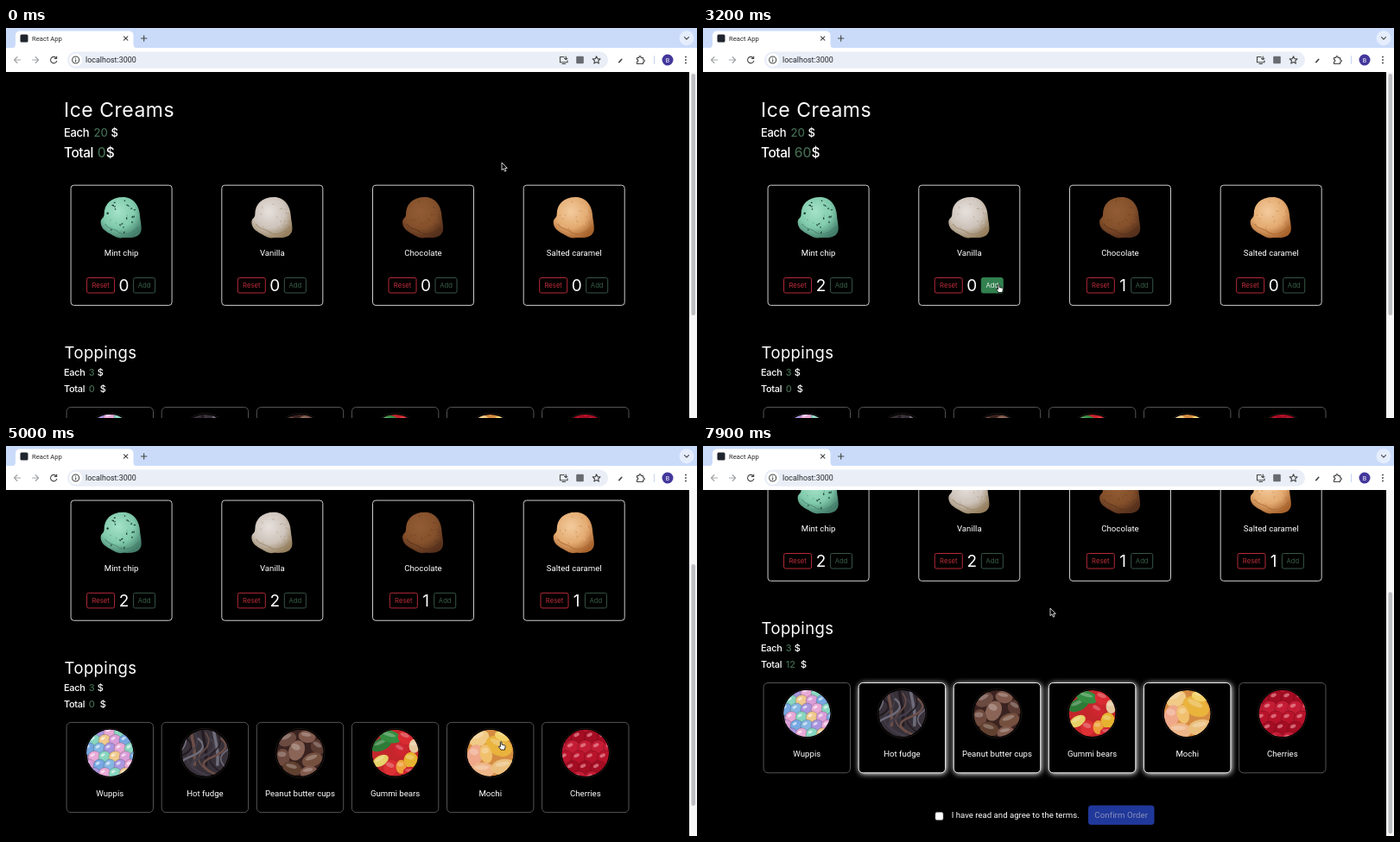
These frames come from a looping animation (800 by 452 pixels, 8 s). An HTML page:

```html
<!DOCTYPE html>
<html lang="en">
<head>
<meta charset="utf-8">
<title>Ice cream order</title>
<style>
  html, body { margin: 0; width: 100%; height: 100%; overflow: hidden; background: #000; }
  svg { display: block; width: 800px; height: 452px; }
  text { font: 9.65px Roboto, sans-serif; fill: #fff; }
  .mid { text-anchor: middle; }
  .h1 { font: 23px Inter, sans-serif; letter-spacing: .5px; }
  .h2 { font: 18.5px Inter, sans-serif; letter-spacing: .4px; }
  .l { font: 500 15.5px Inter, sans-serif; }
  .m { font: 500 13.1px Inter, sans-serif; }
  .s { font: 500 11px Inter, sans-serif; }
  .word { letter-spacing: -.03em; }
  .count { font: 19px Inter, sans-serif; }
  .btn text { font: 7.7px Inter, sans-serif; }
  .green { fill: #41684f; }
  .btn rect { fill: #000; stroke: var(--line); }
  .btn text { fill: var(--ink); }
  .btn.hover rect { fill: var(--on); stroke: var(--on); }
  .btn.hover text { fill: #e8eee9; }
  .reset { --line: #b52a38; --ink: #c22e3c; --on: #c93443; }
  .add { --line: #365646; --ink: #386049; --on: #32804f; }
  .topping > .glow { visibility: hidden; }
  .topping > .card { fill: #000; stroke: #555; }
  .topping.on > .glow { visibility: visible; }
  .topping.on > .card { stroke: #eee; }
  .icon { fill: none; stroke: #454746; stroke-width: 1.1; stroke-linecap: round; stroke-linejoin: round; }
</style>
</head>
<body>
<svg id="stage" viewBox="0 0 800 452"></svg>
<script>
const LOOP = 8000;
const byId = id => document.getElementById(id);
const text = (x, y, str, cls = '', extra = '') =>
  `<text x="${x}" y="${y}" class="${cls}" ${extra}>${str}</text>`;
const rect = (x, y, w, h, r, extra = '') =>
  `<rect x="${x}" y="${y}" width="${w}" height="${h}" rx="${r}" ${extra}/>`;
const circle = (x, y, r, fill, extra = '') =>
  `<circle cx="${x}" cy="${y}" r="${r}" fill="${fill}" ${extra}/>`;
const ellipse = (x, y, rx, ry, turn, fill) =>
  `<ellipse rx="${rx}" ry="${ry}" fill="${fill}" transform="translate(${x} ${y}) rotate(${turn})"/>`;
const icon = (d, extra = '') => `<path class="icon" d="${d}" ${extra}/>`;
const range = n => [...Array(n).keys()];
function seeded(seed) {
  return () => (seed = (seed * 16807) % 2147483647) / 2147483647;
}

// Ice creams: name, light, middle and dark tone
const creams = [
  ['Mint chip', '#a5e3c9', '#7fc9aa', '#447e6b'],
  ['Vanilla', '#e6e0dc', '#cdc3ba', '#96805f'],
  ['Chocolate', '#925d35', '#84502b', '#56301c'],
  ['Salted caramel', '#f3cb9d', '#e3aa70', '#a9642e']
];
const creamX = i => 133.6 + 174.7 * i;
const SCOOP = 'M2-24C14-24 21-14 21.500-2C22 5 25 14 21.500 18C18 24 8 23 2 23C-4 25-10 20-14 18' +
  'C-18 16-24 12-24 5C-24 0-20 1-20-4C-20-16-12-24 2-24Z';

function scoop(i) {
  const rnd = seeded(71 + i * 13), [, light, , dark] = creams[i];
  const specks = range(i ? 26 : 34).map(k => {
    const a = rnd() * 6.28, r = Math.sqrt(rnd()) * 20;
    const x = 1 + r * Math.cos(a), y = r * Math.sin(a) - 1;
    if (!i && k < 22) return ellipse(x, y, .8 + rnd() * .7, .7, rnd() * 180, '#1f3f38');
    return `<g opacity=".4">${ellipse(x, y, 1 + rnd(), .5, rnd() * 90, k % 2 ? light : dark)}</g>`;
  }).join('');
  return `<path d="${SCOOP}" fill="url(#scoop${i})"/>${specks}
    <path d="M-19 7C-14 15-7 12-3 17C4 21 14 18 20 10" fill="none" stroke="${dark}" stroke-width="1.3" opacity=".6"/>`;
}

const button = (kind, label, i, x, w) => `<g class="btn ${kind}" id="${kind}${i}">
  ${rect(x, 289.5, w, 17.5, 2)}${text(x + w / 2, 301.2, label, 'mid')}</g>`;

const creamCard = ([name], i) => `<g transform="translate(${creamX(i)})">
  ${rect(-58.5, 182.2, 117, 139.2, 3.5, 'fill="#000" stroke="#ccc"')}
  <g transform="translate(0 220)">${scoop(i)}</g>
  ${text(0, 263.7, name, 'mid')}
  ${button('reset', 'Reset', i, -40, 32)}
  ${text(3, 305, '0', 'count mid', `id="count${i}"`)}
  ${button('add', 'Add', i, 14, 25)}</g>`;

// Toppings
const balls = (r, step, colors, shine) => range(30).map(k => {
  const row = Math.floor(k / 5), col = k % 5;
  const x = (col - 2 + row % 2 / 2) * step, y = (row - 2.5) * step * .8;
  return circle(x, y, r, colors[(k * 3 + row) % colors.length], 'stroke="#0003"') +
    ellipse(x - r * .3, y - r * .35, r * .38, r * .22, -25, shine);
}).join('');
const blobs = list => list.map(([color, x, y, rx, ry, turn]) =>
  ellipse(x, y, rx, ry, turn, color) +
  `<g opacity=".25">${ellipse(x - 1, y - ry * .35, rx * .6, ry * .3, turn, '#fff')}</g>`).join('');
const swirls = () => range(13).map(k => {
  const x = -26 + k * 4.4, bend = 8 * Math.sin(k * 2.1);
  return `<path d="M${x} ${-24 + bend}q${9 + bend} 12 ${-3 - bend} 22t${8 + bend} 24" fill="none"
    stroke="${['#6e6c7b', '#241c22', '#6b4e48', '#433d49'][k % 4]}" stroke-width="${1.5 + k % 3}"/>`;
}).join('');

const toppings = [
  ['Wuppis', '#8b83b5', balls(7.2, 12,
    ['#86b7e4', '#d99dd8', '#87d6c0', '#a996df', '#77a8e2', '#f0c98d', '#e9a9d6'], '#fff9')],
  ['Hot fudge', '#383139', swirls()],
  ['Peanut butter cups', '#3a2320', blobs([
    ['#6b4a40', -15, -16, 11, 8, -25], ['#80594c', 8, -19, 10, 7, 10], ['#5c3b32', 21, -7, 9, 8, 30],
    ['#8a6557', -4, -3, 9, 12, 25], ['#6e493d', -20, 5, 8, 10, 0], ['#75503f', 14, 8, 12, 8, -20],
    ['#60402f', -9, 18, 11, 8, 15], ['#805a4d', 10, 22, 10, 7, -10]])],
  ['Gummi bears', '#c4262b', blobs([
    ['#2d7b37', -16, -10, 13, 7, -25], ['#348d41', -6, -19, 13, 7, 15], ['#d82b32', 12, -18, 9, 8, 20],
    ['#e6c79c', 22, -8, 6, 8, 0], ['#cf2530', 6, -4, 8, 7, 30], ['#e5b32f', 18, 8, 8, 9, 10],
    ['#e7d168', -17, 9, 10, 6, -30], ['#dc3034', -5, 17, 8, 9, 20], ['#eda03a', 7, 16, 6, 8, 0],
    ['#d32631', 18, 22, 9, 6, 0]])],
  ['Mochi', '#d58c42', blobs([
    ['#f0ca86', -13, -17, 12, 9, -25], ['#e9b33c', 10, -8, 16, 11, 25], ['#f2d169', 15, -20, 10, 6, 10],
    ['#efa88a', -18, 3, 9, 13, 15], ['#f1c06d', -5, 1, 7, 11, -15], ['#efb68a', -9, 20, 14, 9, 0],
    ['#eabf7d', 15, 16, 14, 9, -10]])],
  ['Cherries', '#5e0713', balls(9, 15, ['#b9132b', '#a50d23', '#c51c35'], '#f0a0a999')]
];
const topX = i => 120.3 + 110.1 * i;
const toppingCard = ([name, base, art], i) => `<g class="topping" id="topping${i}" transform="translate(${topX(i)})">
  ${rect(-50, 440, 101.5, 105, 6, 'class="glow" fill="#fff" filter="url(#blur)"')}
  ${rect(-50.2, 439.5, 100.4, 104.3, 5, 'class="card"')}
  <g transform="translate(0 475)">
    ${circle(0, 0, 28.5, 'none', 'stroke="#1b1715"')}
    <g clip-path="url(#round)">${circle(0, 0, 27, base)}${art}</g>
  </g>
  ${text(0, 524.8, name, 'mid')}</g>`;

const page = `<g id="page">
  ${text(67, 102.7, 'Ice Creams', 'h1')}
  ${text(67, 125.8, 'Each', 'm word')}${text(101.5, 125.8, '<tspan class="green">20</tspan> $', 'm')}
  ${text(67, 150.2, 'Total', 'l word')}${text(105.7, 150.2, '', 'l', 'id="creamTotal"')}
  ${creams.map(creamCard).join('')}
  ${text(67.5, 382.7, 'Toppings', 'h2')}
  ${text(67, 402.8, 'Each', 's word')}${text(95.8, 402.8, '<tspan class="green">3</tspan> $', 's')}
  ${text(67, 421.8, 'Total', 's word')}${text(95.8, 421.8, '', 's', 'id="topTotal"')}
  ${toppings.map(toppingCard).join('')}
  ${rect(269, 589.5, 9, 9, 1.8, 'fill="#fff" stroke="#888" stroke-width=".6"')}
  ${text(287.7, 596.3, 'I have read and agree to the terms.')}
  ${rect(446, 581.5, 76.5, 22.5, 3.500, 'fill="#20389a"')}
  ${text(484.2, 596.3, 'Confirm Order', 'mid', 'style="fill:#8790b8;letter-spacing:.1px"')}
</g>`;

const browser = `
  ${rect(791, 51, 9, 401, 0, 'fill="#f7f7f8"')}
  ${rect(793.5, 53, 4.6, 280, 2.3, 'id="thumb" fill="#bdbec1"')}
  ${rect(0, 0, 800, 24, 0, 'fill="#cadbfa"')}
  ${rect(0, 23, 800, 28, 0, 'fill="#fff"')}
  <path d="M6 23.500q5 0 5-5V9q0-5.500 5.500-5.500H142q5.500 0 5.500 5.500v9.500q0 5 5 5Z" fill="#fff"/>
  ${rect(16.5, 7.5, 9, 9, 1.5, 'fill="#20252d"')}
  ${text(30, 14.8, 'React App', '', 'style="font-size:7.65px;fill:#25272a"')}
  ${icon('M136.500 9.800l4.400 4.400m0-4.400l-4.400 4.400M156.500 12h6.400m-3.200-3.200v6.400')}
  ${circle(788, 11.8, 8.5, '#e5edfd')}
  ${icon('M785.500 10.700l2.500 2.500l2.500-2.500')}
  ${icon('M16.700 37H9.500m3.500-3.500L9.500 37l3.500 3.500M30.500 37h7.200m-3.500-3.500l3.500 3.500l-3.500 3.500', 'style="stroke:#a2a5a8"')}
  ${icon('M58.300 35A3.700 3.700 0 1 0 58.800 38.200M58.700 33v2.500h-2.500')}
  ${rect(71, 27.5, 626, 19.2, 9.6, 'fill="#e9eef7"')}
  ${circle(80.7, 37, 7.5, '#fff')}
  ${icon('M80.700 36.800v2.200m0-4v.1M84.700 37a4 4 0 1 1-8 0a4 4 0 1 1 8 0')}
  ${text(92, 40.2, 'localhost:3000', '', 'style="font-size:8.95px;fill:#26282b"')}
  ${icon('M646 33.500h-4.500v6.200h8.500v-2M644 41.500h3.500M648.200 33v3.600m-1.700-1.500l1.700 1.600l1.700-1.600')}
  ${rect(660.2, 32.7, 8.6, 8.6, 1, 'fill="#686b70"')}
  ${icon('M683.600 32.700l1.300 2.900l3.100.3l-2.300 2.100l.7 3.100l-2.800-1.600l-2.800 1.600l.7-3.100l-2.300-2.100l3.100-.3Z')}
  ${icon('M709.800 39.600l3-3.300', 'style="stroke-width:1.600"')}
  ${icon('M730.500 34.500h2.300c-.3-2.500 2.700-2.500 2.400 0h2.400v2.400c2.300-.3 2.300 2.700 0 2.400v2.200h-7.100v-2.400c2-.2 2-2.300 0-2.500Z')}
  ${icon('M750.500 32.500v9', 'style="stroke:#c9d8f3"')}
  ${circle(766, 37, 6.5, '#42379b')}
  ${text(766, 39.6, 'B', 'mid', 'style="font-size:7px"')}
  ${[33.5, 37, 40.5].map(y => circle(787, y, .95, '#454746')).join('')}`;

byId('stage').innerHTML = `<defs>
  ${creams.map(([, a, b, c], i) => `<radialGradient id="scoop${i}" cx=".43" cy=".35" r=".68">
    <stop stop-color="${a}"/><stop offset=".6" stop-color="${b}"/><stop offset="1" stop-color="${c}"/></radialGradient>`).join('')}
  <clipPath id="round"><circle r="27"/></clipPath>
  <filter id="blur" x="-20%" y="-20%" width="140%" height="140%"><feGaussianBlur stdDeviation="3.2"/></filter>
  </defs>${page}${browser}
  <g id="cursor" stroke-linejoin="round" stroke-width=".8">
    <path id="arrow" d="M0 0V8.700L2 6.900L3.500 10.200L5 9.500L3.600 6.400H6.300Z" fill="#000" stroke="#fff"/>
    <path id="hand" d="M-.8 .6Q0-.6.8.6V3.500L4.200 4.300Q5.200 4.600 5 5.800L4.200 9.500H-.2L-2.900 6Q-2.600 4.800-.8 6Z" fill="#fff" stroke="#000"/>
  </g>`;

// Motion: [time, ...values], eased between neighbours
const pointer = [
  [0, 574, 156], [800, 160, 297], [1600, 161, 298], [2200, 503.5, 309], [2400, 510, 299],
  [2750, 509, 299], [3100, 342.5, 297], [3700, 341, 297], [4050, 684, 297], [4350, 684, 298],
  [4700, 576.5, 350], [5150, 572, 340], [5350, 556, 320], [5450, 555, 320], [5700, 460, 316],
  [5920, 458, 317], [6120, 342, 318], [6300, 340, 318], [6550, 246, 315], [7000, 244, 315], [7900, 402, 188]
];
const scrolling = [[0, 0], [4632, 0], [5200, 166], [7800, 166], [7900, 165]];
const creamClicks = [[1000, 0], [1350, 0], [2500, 2], [3300, 1], [3550, 1], [4200, 3]];
const toppingClicks = [[5420, 4], [5850, 3], [6200, 2], [6600, 1]];

function at(keys, t) {
  const k = keys.findIndex(key => key[0] > t);
  if (k < 0) return keys.at(-1).slice(1);
  const [t0, ...from] = keys[k - 1], [t1, ...to] = keys[k];
  const u = (t - t0) / (t1 - t0), e = u * u * (3 - 2 * u);
  return from.map((v, i) => v + (to[i] - v) * e);
}

function draw(t) {
  const [x, y] = at(pointer, t), [scroll] = at(scrolling, t);
  const inside = (left, top, w, h) => x >= left && x <= left + w && y + scroll >= top && y + scroll <= top + h;
  let hand = false, creamSum = 0, topSum = 0;

  creams.forEach((_, i) => {
    const count = creamClicks.filter(([time, item]) => item === i && time <= t).length;
    const shift = count === 1 ? 1.3 : 0;
    creamSum += 20 * count;
    byId('count' + i).textContent = count;
    [['reset', -40, 32, shift], ['add', 14, 25, -shift]].forEach(([kind, left, w, move]) => {
      const el = byId(kind + i), over = inside(creamX(i) + left + move, 289.5, w, 17.5);
      el.setAttribute('transform', `translate(${move})`);
      el.classList.toggle('hover', over);
      hand ||= over;
    });
  });
  toppings.forEach((_, i) => {
    const on = toppingClicks.some(([time, item]) => item === i && time <= t);
    topSum += on ? 3 : 0;
    byId('topping' + i).classList.toggle('on', on);
    hand ||= inside(topX(i) - 50, 439.5, 100, 104);
  });

  byId('creamTotal').innerHTML = `<tspan class="green">${creamSum}</tspan>$`;
  byId('topTotal').innerHTML = `<tspan class="green">${topSum}</tspan>\u00a0\u00a0$`;
  byId('page').setAttribute('transform', `translate(0 ${-scroll})`);
  byId('thumb').setAttribute('y', 53 + scroll * 117 / 166);
  byId('cursor').setAttribute('transform', `translate(${x} ${y})`);
  byId('arrow').setAttribute('visibility', hand ? 'hidden' : 'visible');
  byId('hand').setAttribute('visibility', hand ? 'visible' : 'hidden');
}

const start = performance.now();
(function frame() {
  draw((performance.now() - start) % LOOP);
  requestAnimationFrame(frame);
})();
</script>
</body>
</html>
```
